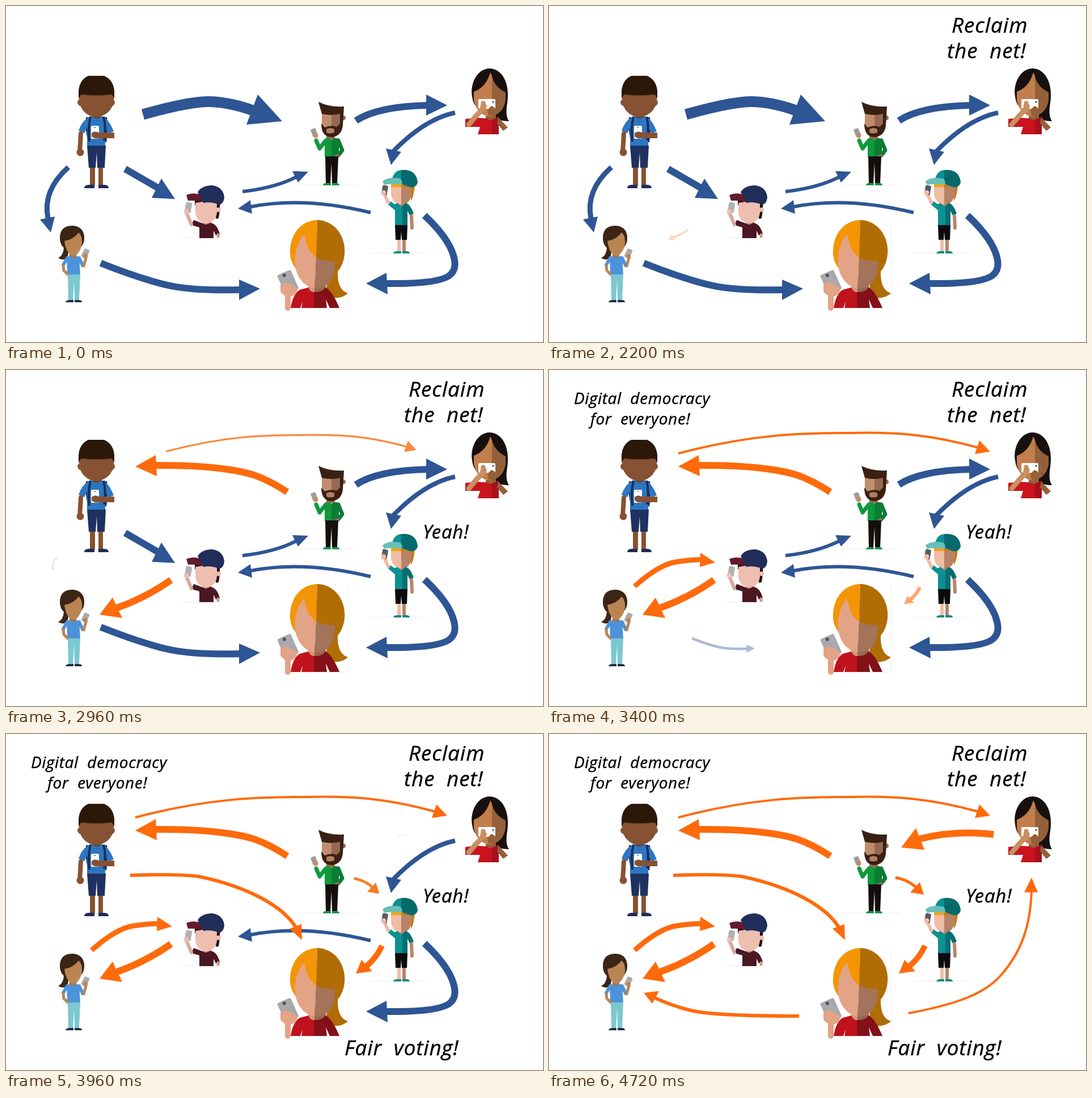
An HTML page that plays this animation: 947 px wide and 592 px high, repeating every 6.02 s.

```html
<!DOCTYPE html>
<html lang="en">
<head>
<meta charset="utf-8">
<title>Messages</title>
<style>
html, body { margin: 0; width: 100%; height: 100%; overflow: hidden; background: #fff; }
svg { display: block; width: 947px; height: 592px; }
text { font: italic 37px "Open Sans", "Noto Sans", sans-serif; letter-spacing: .025em; word-spacing: .27em; fill: #000; stroke: #000; stroke-width: .4px; }
.small { font-size: 28px; }
.mid { font-size: 33px; }
.arrow { transform-box: fill-box; transform-origin: center; }
.limb { fill: none; stroke-linecap: round; stroke-linejoin: round; }
</style>
</head>
<body>
<svg viewBox="0 0 947 592">
  <g id="arrows"></g>

  <!-- boy with backpack -->
  <g>
    <path fill="#6b4129" d="M152 188h16v12q-8 6-16 0z"/>
    <circle cx="132" cy="170" r="6" fill="#865233"/><circle cx="186" cy="170" r="6" fill="#865233"/>
    <path fill="#865233" d="M129 152V170Q133 186 147 193Q159 198 171 193Q186 186 190 170V152Z"/>
    <path fill="#2b1808" d="M128 164V149Q130 130 145 123H173Q189 130 191 149V164Q189 156 184 156Q159 159 135 156Q130 156 128 164Z"/>
    <path fill="#1d2d57" d="M141 196h10v44h-6q-6-20-4-44zM169 196h9q3 22-1 44h-6z"/>
    <path fill="#2d76c2" d="M147 195L152 194Q159 203 168 194L174 196Q184 205 190 221L181 224L175 215V247H143V214L138 224L128 220Q133 203 147 195Z"/>
    <path fill="none" stroke="#1d2d57" stroke-width="4" d="M149 195Q144 215 147 239M172 195Q177 213 173 237"/>
    <path class="limb" stroke="#865233" stroke-width="8" d="M132 225L130 257"/>
    <circle cx="131" cy="258" r="6.5" fill="#865233"/>
    <rect x="150" y="211" width="14" height="23" rx="2" fill="#fff"/>
    <circle cx="157" cy="214" r="1.2" fill="#777"/>
    <path fill="#865233" d="M151 224Q156 219 164 223L191 223V233H163Q157 235 151 230Z"/>
    <path fill="#865233" d="M148 282h9v34h-9zM163 282h8v34h-8z"/>
    <path fill="#1f3160" d="M143 246H176L174 285H161L160 258L158 285H146Z"/>
    <path fill="#1d2d57" d="M138 321Q138 315 146 315H156V321ZM163 315H173Q181 315 181 321H163Z"/>
  </g>

  <!-- man with beard -->
  <g>
    <path stroke="#eee" d="M515 315.500H620"/>
    <path fill="#966a50" d="M565 222h15v13h-15z"/>
    <circle cx="595" cy="197" r="4" fill="#966a50"/>
    <path fill="#c18d6d" d="M557 187H574V227Q557 225 557 209Z"/>
    <path fill="#966a50" d="M574 187H593V209Q591 227 574 227Z"/>
    <path fill="#392013" d="M551 169Q572 179 596 177L594 211Q591 231 572 231Q556 229 556 207L562 214Q572 209 583 213L589 207V190Q574 194 557 190Z"/>
    <path fill="#b47e61" d="M565 217Q572 213 579 217V223Q572 226 565 223Z"/>
    <path fill="#0f993b" d="M562 234Q568 231 574 236V266H562Z"/><path fill="#0b7d35" d="M574 236Q581 230 587 235V266H574Z"/>
    <path class="limb" stroke="#0f993b" stroke-width="7" d="M564 237L553 251L547 237"/>
    <path class="limb" stroke="#0b7d35" stroke-width="7" d="M586 237L593 254L586 263"/>
    <path class="limb" stroke="#966a50" stroke-width="6" d="M585 264L580 267"/>
    <rect x="539" y="216" width="9" height="14" rx="2" fill="#9c9da0" transform="rotate(-22 543 223)"/>
    <circle cx="546" cy="228" r="4.500" fill="#c18d6d"/>
    <path fill="#140e0c" d="M563 265H586L584 313H575L574 276L572 313H564Z"/>
    <path fill="#13934a" d="M559 316Q559 312 565 312H573V316ZM575 312H583Q588 312 588 316H575Z"/>
  </g>

  <!-- woman taking a photo -->
  <g>
    <path fill="#17100e" d="M853 110C831 110 818 137 822 159Q823 174 834 182L861 192Q865 203 887 203Q880 193 884 171C889 137 876 111 853 110Z"/>
    <path fill="#936039" d="M846 185H864V204H846Z"/>
    <path fill="#c27e4c" d="M854 117Q847 143 825 151V166Q829 185 843 192Q850 196 857 194V123Z"/>
    <path fill="#936039" d="M857 124Q862 143 881 152V166Q878 184 865 191L857 194Z"/>
    <path fill="#c9131d" d="M810 199L831 197L848 198Q853 202 857 200V226H832L836 213H810Z"/>
    <path fill="#a7101c" d="M857 200L869 195V226H857Z"/>
    <path fill="#936039" d="M868 196L885 214L877 220L866 207Z"/>
    <rect x="833" y="164" width="30" height="17" rx="2" fill="#fff"/>
    <path class="limb" stroke="#c78f62" stroke-width="9" d="M842 180Q829 193 816 209"/>
    <path fill="#c78f62" d="M838 168L844 167L848 177L843 187L836 181Z"/>
    <path fill="#936039" d="M849 183L856 176L862 179L860 192L851 194Z"/>
    <circle cx="859" cy="169" r="1.500" fill="#333"/>
  </g>

  <!-- young man in teal -->
  <g>
    <path stroke="#eee" d="M641 435.500H745"/>
    <path fill="#b98368" d="M691 344h13v8h-13z"/>
    <path fill="#e9a41c" d="M679 313H697V322H679Z"/><path fill="#c47c14" d="M697 313H721Q720 334 714 344V322H697Z"/>
    <path fill="#efbca5" d="M679 319H697V350Q681 348 679 331Z"/>
    <path fill="#b98368" d="M697 319H715V334Q711 350 697 350Z"/>
    <path fill="#0c9092" d="M681 304Q685 290 697 289V313L682 306Z"/>
    <path fill="#066a6c" d="M697 289Q724 287 726 311Q723 321 712 319L697 313Z"/>
    <path fill="#66bfb8" d="M664 309Q674 300 695 304Q700 308 698 315Q680 312 667 315Z"/>
    <path fill="#0c9092" d="M685 349L691 347Q694 353 699 352V387H686V360L674 350L678 344Z"/>
    <path fill="#066f71" d="M699 352L705 347Q713 349 719 366L712 369L708 361V387H699Z"/>
    <path class="limb" stroke="#efbca5" stroke-width="6" d="M674 346L668 333"/>
    <rect x="663" y="316" width="10" height="17" rx="2" fill="#5a5b5e" transform="rotate(10 668 324)"/>
    <circle cx="666" cy="329" r="4.500" fill="#efbca5"/>
    <path class="limb" stroke="#b98368" stroke-width="6" d="M715 370L716 391"/>
    <path fill="#efbca5" d="M690 409h6v23h-6z"/><path fill="#b98368" d="M699 409h6v23h-6z"/>
    <path fill="#0b0b0d" d="M686 386H708L707 412H698L697 397L696 412H687Z"/>
    <path fill="#0b8587" d="M683 436Q684 432 690 432H697V436ZM699 432H706Q712 432 712 436H699Z"/>
  </g>

  <!-- kid with cap -->
  <g>
    <path stroke="#eee" d="M312 408.500H378"/>
    <path fill="#c99686" d="M347 376h15v8h-15z"/>
    <path fill="#281016" d="M333 343H377Q378 358 375 374L370 375V351H333Z"/>
    <circle cx="375" cy="359" r="4" fill="#eebeb0"/>
    <path fill="#eebeb0" d="M334 347Q353 342 372 347V364Q370 381 353 383Q336 381 334 364Z"/>
    <path fill="#641a2b" d="M318 333Q329 328 342 332L355 346Q334 342 321 343Z"/>
    <path fill="#202e59" d="M338 328Q345 316 364 316Q383 319 385 337Q384 349 376 350Q360 344 348 347Z"/>
    <path fill="#4b1723" d="M331 377L347 383Q353 387 360 382Q372 383 377 402L370 404L366 396V409H341V390L327 386Z"/>
    <path class="limb" stroke="#d8aa9a" stroke-width="6" d="M327 385L319 366"/>
    <rect x="316" y="346" width="11" height="18" rx="2" fill="#b0b1b3" transform="rotate(10 321 355)"/>
    <circle cx="318" cy="362" r="4.500" fill="#eebeb0"/>
    <path class="limb" stroke="#c99686" stroke-width="5" d="M374 403V406"/>
  </g>

  <!-- girl in blue -->
  <g>
    <path fill="#3c2515" d="M117 387Q94 387 95 411Q96 421 102 426Q101 440 92 444Q104 451 109 440Q111 434 108 427H130Q139 420 138 406Q136 388 117 387Z"/>
    <path fill="#a67447" d="M112 432h12v12h-12z"/>
    <path fill="#ba8553" d="M103 414Q120 411 128 399Q135 405 134 419Q131 436 119 441Q106 437 103 414Z"/>
    <path fill="#4d93db" d="M107 441H113Q118 447 124 441H129L131 474H108Z"/>
    <path class="limb" stroke="#4d93db" stroke-width="6" d="M108 444L101 456M129 444L135 457"/>
    <path class="limb" stroke="#ba8553" stroke-width="5" d="M101 458L102 466L109 473M137 458L141 444"/>
    <rect x="135" y="428" width="10" height="16" rx="2" fill="#a9aaac" transform="rotate(26 140 436)"/>
    <circle cx="140" cy="441" r="4" fill="#ba8553"/>
    <path fill="#7dc8d0" d="M109 473H131L129 518H121L120 484L118 518H110Z"/>
    <path fill="#1d2d4d" d="M105 522Q106 518 112 518H119V522ZM121 518H128Q134 518 134 522H121Z"/>
  </g>

  <!-- blonde woman -->
  <g>
    <path stroke="#eee" d="M480 532.500H604M603.500 378V532"/>
    <path fill="#b06d05" d="M575 460L585 468Q584 500 603 506Q590 518 569 513Q560 508 566 492Q573 478 575 460Z"/>
    <path fill="#f39505" d="M549 377C519 378 499 404 501 438Q503 454 512 463L547 467Z"/>
    <path fill="#b06d05" d="M549 377C579 378 600 405 597 438Q594 462 579 473H546Z"/>
    <path fill="#d5967a" d="M533 484H544V508H533Z"/><path fill="#96684f" d="M544 484H564V506H544Z"/>
    <path fill="#e3a386" d="M526 402Q530 432 547 443L544 498Q519 492 511 464Q505 426 526 402Z"/>
    <path fill="#a3735a" d="M547 443Q562 451 580 449Q581 484 562 494Q553 498 544 498Z"/>
    <path fill="#c0121d" d="M518 500L533 496Q538 505 543 504V532H521L523 521L519 532H502Q506 507 518 500Z"/>
    <path fill="#84101a" d="M543 504Q558 505 563 496Q574 499 588 532H571L564 517L566 532H543Z"/>
    <path class="limb" stroke="#e3a386" stroke-width="10" stroke-linecap="butt" d="M497 500V532"/>
    <g transform="rotate(-24 497 486)">
      <rect x="484" y="468" width="26" height="37" rx="3" fill="#a8a9ac"/>
      <circle cx="496" cy="473" r="3" fill="#505155"/>
    </g>
    <path fill="#e3a386" d="M484 491L494 486L505 492L514 498Q512 510 501 512Q489 512 484 503Z"/>
  </g>

  <g id="texts">
    <text x="710" y="47">Reclaim</text>
    <text x="702" y="92">the net!</text>
    <text class="mid" x="735" y="297">Yeah!</text>
    <text class="small" x="44" y="60">Digital democracy</text>
    <text class="small" x="73" y="96">for everyone!</text>
    <text x="597" y="566">Fair voting!</text>
  </g>
</svg>
<script>
const BLUE = "#2e5594", ORANGE = "#ff6a0b";
const LOOP = 6020, STEP = 40, FIRST = 2276, SPAN = 244;
const NS = "http://www.w3.org/2000/svg";
const layer = document.getElementById("arrows");

// shaft, width, head, step of the sequence
const leaving = [
  ["M241.500 191Q310 172 345 169Q385 166 438 185", 19, "444,156 487,203 424,209", 1],
  ["M110 284Q64 325 74 374", 9, "60,376 86,371 79,399", 2],
  ["M210 287L267 320", 12, "274,304 298,340 257,338", 3],
  ["M167 453Q240 482 290 493Q335 502 414 500", 12, "411,482 448,498 411,518", 4],
  ["M417 327Q477 320 514 300", 6, "505,291 533,292 515,311", 5],
  ["M617 202Q655 177 743 175", 12, "741,156 778,175 741,193", 6],
  ["M792 188Q738 199 682 257", 8, "670,251 697,257 679,280", 7],
  ["M643 364Q525 335 430 354", 6, "409,357 431,342 434,366", 8],
  ["M738 369Q782 410 790 443Q795 462 785 472Q770 490 670 489", 12, "635,489 671,470 673,508", 9]
];
const coming = [
  ["M291 370Q245 402 196 419", 12, "188,401 165,431 205,437", 0],
  ["M496 215C450 185 425 180 390 175C340 168 300 168 263 168", 12, "264,150 228,170 266,187", 1],
  ["M228 147C360 112 450 111 530 111C610 109 670 113 758 137", 4, "759,124 778,144 751,148", 2],
  ["M151 381Q195 342 225 338T269 334", 9, "267,322 293,339 266,347", 3],
  ["M663 373Q655 392 636 409", 10, "627,398 617,422 646,418", 4],
  ["M219 249Q300 246 340 251C430 270 490 305 512 342", 6, "500,343 521,335 522,363", 5],
  ["M611 253Q635 257 650 273", 5, "654,261 661,283 637,279", 6],
  ["M784 177Q715 169 653 185", 12, "647,166 621,200 662,204", 7],
  ["M441 497Q290 497 250 487Q217 479 187 465", 6, "194,453 167,456 182,475", 8],
  ["M634 492C725 475 770 456 797 425C835 382 849 335 851 276", 4, "838,279 851,253 862,279", 9]
];

function add(parent, tag, attrs) {
  const el = document.createElementNS(NS, tag);
  for (const key in attrs) el.setAttribute(key, attrs[key]);
  return parent.appendChild(el);
}

function makeArrow([d, width, points, step], color, grows) {
  const el = add(layer, "g", { class: "arrow" });
  add(el, "path", { d, fill: "none", stroke: color, "stroke-width": width });
  add(el, "polygon", { points, fill: color });
  return { el, step, grows };
}

const arrows = [
  ...leaving.map(a => makeArrow(a, BLUE, false)),
  ...coming.map(a => makeArrow(a, ORANGE, true))
];
const texts = [...document.querySelectorAll("#texts text")];
const textTimes = [1800, 1800, 2760, 3240, 3240, 3760];

const clamp = v => Math.max(0, Math.min(1, v));

function progress(step, t) {
  if (step === 0) return clamp((t - 1840) / 680) ** 2;
  return clamp((t - FIRST - SPAN * step) / SPAN);
}

function draw(now) {
  const t = Math.min(4720, Math.floor(now % LOOP / STEP) * STEP);
  for (const { el, step, grows } of arrows) {
    const p = progress(step, t);
    const size = grows ? p : 1 - p;
    el.style.display = size > 0 ? "" : "none";
    el.style.opacity = size;
    el.style.transform = `scale(${size})`;
  }
  texts.forEach((el, i) => el.style.display = t >= textTimes[i] ? "" : "none");
}

const start = performance.now();
function tick() {
  draw(performance.now() - start);
  requestAnimationFrame(tick);
}
tick();
</script>
</body>
</html>
```
